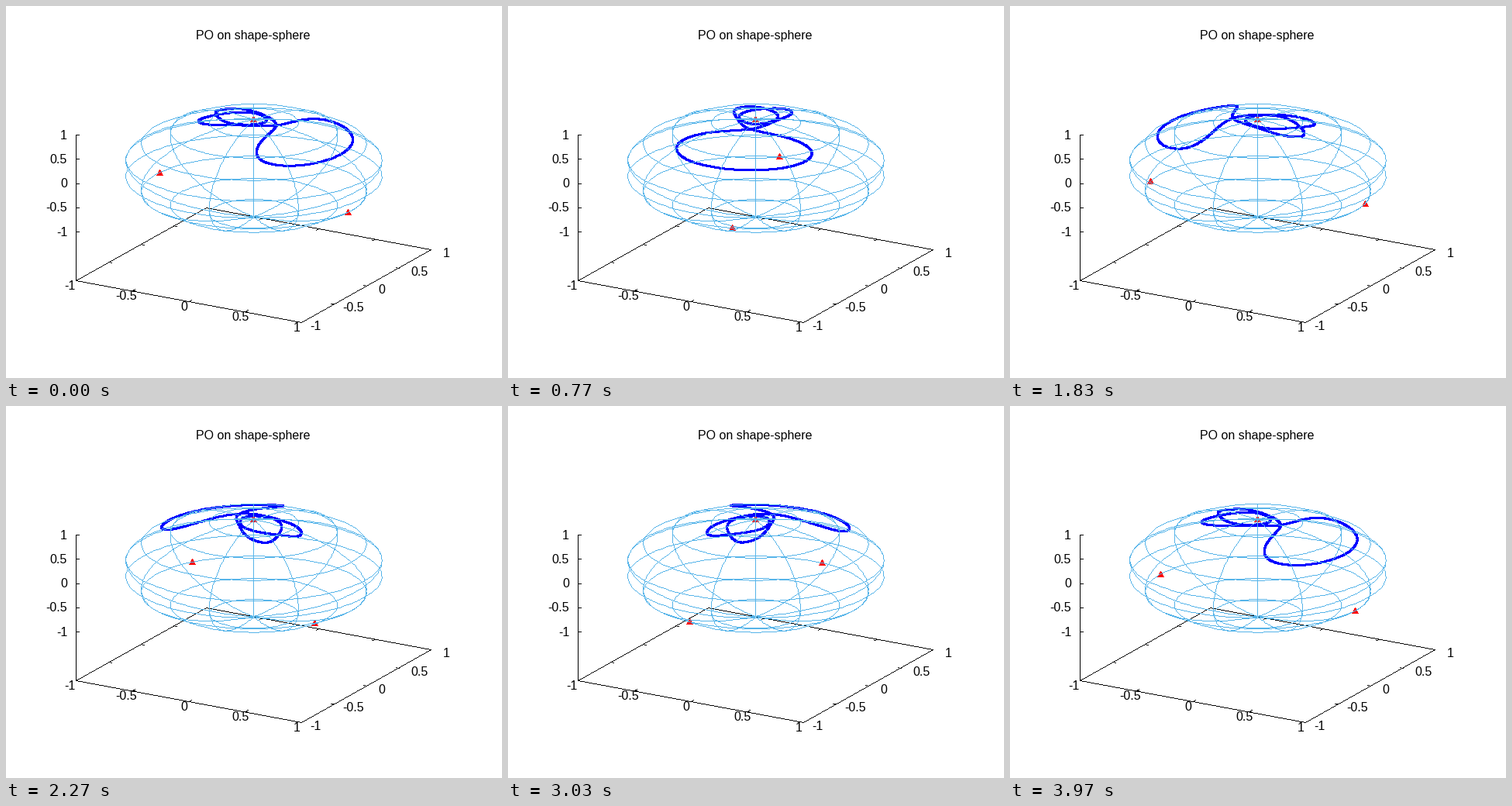
Recreate the animation shown at these times as a matplotlib script. Size 640 px wide and 480 px high, loop 4010 ms.

```python
import numpy as np
import matplotlib.pyplot as plt
from matplotlib.animation import FuncAnimation

W, H = 640, 480
LOOP, TICK, POSES = 4010, 10, 120
CENTER = (319.4, 208.9)        # screen position of the sphere's centre
WIDE, DEEP, TALL = 167.7, 54.2, 62.5
TURN = np.radians(30)
FLOOR = -2.0
LEFT, RIGHT, TOP, BOTTOM = 80, 560, 110, 420    # part of the stage with lines
BLACK, SKY, BLUE, RED = (0, 0, 0), (86, 180, 233), (0, 0, 255), (255, 0, 0)

plt.rcParams["font.family"] = "Liberation Sans"
fig = plt.figure(figsize=(W / 100, H / 100), dpi=100, facecolor="white")
base = np.full((H, W, 3), 255, np.uint8)


def project(x, y, z):
    right = x * np.cos(TURN) + y * np.sin(TURN)
    away = y * np.cos(TURN) - x * np.sin(TURN)
    return CENTER[0] + WIDE * right, CENTER[1] - DEEP * away - TALL * z


def pixels(xs, ys):
    return np.rint(np.column_stack([xs, ys])).astype(int)


def trace(xs, ys):
    """Pixels of a one-pixel polyline without smoothing."""
    p = pixels(xs, ys)
    runs = [np.linspace(a, b, max(abs(b - a).max(), 1) + 1)
            for a, b in zip(p, p[1:])]
    return np.rint(np.vstack(runs)).astype(int)


def stamp(canvas, spots, brush, color):
    x, y = (spots[:, None] + brush).reshape(-1, 2).T
    canvas[y, x] = color


def smooth_loop(p, steps=40):
    """Closed cubic spline through p."""
    n = len(p)
    eye = np.eye(n)
    nxt = np.roll(p, -1, axis=0)
    h = np.sqrt(np.hypot(*(nxt - p).T))[:, None]
    h0 = np.roll(h, 1, axis=0)
    pull = (nxt - p) / h**2
    system = (2 * (1 / h + 1 / h0) * eye + np.roll(eye, 1, axis=1) / h
              + np.roll(eye, -1, axis=1) / h0)
    m = np.linalg.solve(system, 3 * (pull + np.roll(pull, 1, axis=0)))
    m1 = np.roll(m, -1, axis=0)
    t = np.linspace(0, 1, steps, endpoint=False)[:, None, None]
    q = ((2 * t**3 - 3 * t**2 + 1) * p + (t**3 - 2 * t**2 + t) * h * m
         + (3 * t**2 - 2 * t**3) * nxt + (t**3 - t**2) * h * m1)
    return q.transpose(1, 0, 2).reshape(-1, 2)


def write(x, y, s, ha):
    fig.text(x / W, 1 - y / H, s, ha=ha, va="baseline", fontsize=16 * 0.72)


def line(xs, ys):
    stamp(base, trace(xs, ys), np.zeros((1, 2), int), BLACK)


def floor_tick(x, y, toward):
    """Short mark from a floor point, 4 px along a floor direction."""
    a = np.array(project(x, y, FLOOR))
    d = np.array(project(x + toward[0], y + toward[1], FLOOR)) - a
    line(*np.array([a, a + 4 * d / np.hypot(*d)]).T)


def draw_axes():
    side = np.array([-1, 1, 1, -1, -1])
    line(*project(side, np.roll(side[:4], 1)[[1, 1, 2, 3, 0]] * 0
                  + np.array([-1, -1, 1, 1, -1]), FLOOR))
    line(*project(-np.ones(2), -np.ones(2), np.array([FLOOR, 1])))
    for v in np.linspace(-1, 1, 5):
        s = f"{v:g}"
        lead = 0 if v < 0 else 4.4     # room kept for the sign
        if abs(v) < 1:
            for e in (-1, 1):
                floor_tick(v, e, (0, -e))
                floor_tick(e, v, (-e, 0))
        x, y = project(v, -1, FLOOR)
        write(x - 8 + lead / 2, y + 12, s, "center")
        x, y = project(1, v, FLOOR)
        write(x + 11.3 + lead, y + 10, s, "left")
        x, y = project(-1, -1, v)
        line([x, x + 4], [y, y])
        write(79, y + 5.5, s, "right")
    write(319, 43.5, "PO on shape-sphere", "center")


def sphere_pixels():
    lines = []
    lon = np.linspace(0, 2 * np.pi, 100)
    for lat in np.radians(np.arange(-70, 71, 20)):
        lines.append(trace(*project(np.cos(lat) * np.cos(lon),
                                    np.cos(lat) * np.sin(lon), np.sin(lat))))
    lat = np.linspace(-np.pi / 2, np.pi / 2, 100)
    for lon in np.radians(np.arange(0, 360, 40)):
        lines.append(trace(*project(np.cos(lat) * np.cos(lon),
                                    np.cos(lat) * np.sin(lon), np.sin(lat))))
    return np.unique(np.vstack(lines), axis=0)


# Key points of half the orbit seen from above the pole; the rest mirrors them.
half = np.array([(.776, 0), (.62, .43), (.40, .525), (.28, .35), (.202, 0),
                 (0, -.143), (-.28, -.222), (-.41, -.15), (-.345, 0),
                 (-.09, .15), (.098, 0)])
orbit = smooth_loop(np.vstack([half, half[-2:0:-1] * (1, -1)]))
orbit_z = np.sqrt(1 - (orbit**2).sum(axis=1))

# Two collision points at latitude -30 degrees, the third on the pole.
hits = np.array([(np.sqrt(.75), 0), (-np.sqrt(.75), 0), (0, 0)])
hits_z = np.array([-.5, -.5, 1])

dot = np.zeros((1, 2), int)
square = np.array([(i, j) for i in (-1, 0, 1) for j in (-1, 0, 1)])
triangle = np.array([(i, j) for j in range(-4, 4)
                     for i in range(-((j + 5) // 2), (j + 5) // 2 + 1)])

draw_axes()
sphere = sphere_pixels()
view = fig.figimage(base[TOP:BOTTOM, LEFT:RIGHT], xo=LEFT, yo=H - BOTTOM,
                    origin="upper")


def spin(points, z, angle):
    c, s = np.cos(angle), np.sin(angle)
    x, y = points.T
    return pixels(*project(c * x - s * y, s * x + c * y, z))


def update(n):
    # 30 poses a second, shown on a 10 ms clock
    pose = min(int((n + .5) * 3 / 10), POSES - 1)
    angle = -2 * np.pi * (pose + 1) / POSES
    canvas = base.copy()
    stamp(canvas, spin(orbit, orbit_z, angle), square, BLUE)
    stamp(canvas, spin(hits, hits_z, angle), triangle, RED)
    stamp(canvas, sphere, dot, SKY)
    view.set_data(canvas[TOP:BOTTOM, LEFT:RIGHT])
    return view,


anim = FuncAnimation(fig, update, frames=LOOP // TICK, interval=TICK,
                     repeat=True, repeat_delay=0)
plt.show()
```
